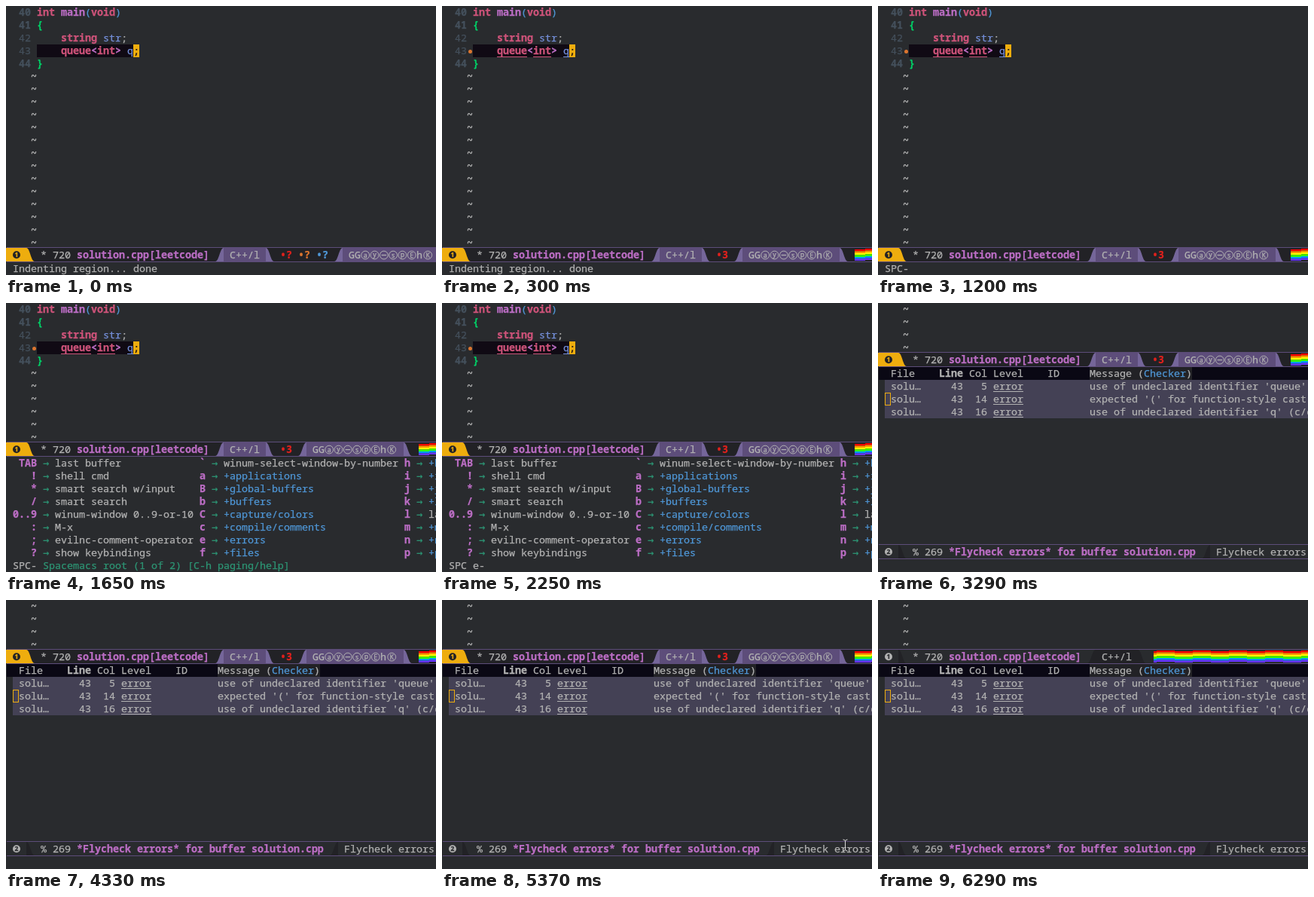
Animation of 571x357 px, one loop 6390 ms. Source, as an HTML page:

```html
<!DOCTYPE html>
<html lang="en">
<head>
<meta charset="utf-8">
<title>Editor session</title>
<style>
  html, body { margin: 0; width: 100%; height: 100%; overflow: hidden; background: #292b2e; }
  svg { display: block; width: 571px; height: 357px; }
  text {
    font: 13.333px "Noto Sans Mono", "DejaVu Sans Mono", monospace;
    white-space: pre; stroke-width: 0.25px;
  }
  .bold { font-weight: 700; }
  .arrow { font-family: "DejaVu Sans Mono", monospace; }
  .tiny { font: 8.8px "Noto Sans", sans-serif; text-anchor: middle; }
  .badge { font: 700 8.5px "Noto Sans", sans-serif; text-anchor: middle; }
</style>
</head>
<body>
<svg id="stage" viewBox="0 0 571 357"></svg>
<script>
const LOOP = 6390, CELL = 8, ROW = 17, LEFT = 9;
const C = {
  bg: '#292b2e', dark: '#222226', deep: '#100a14', head: '#0a0814', base: '#b2b2b2',
  purple: '#5d4d7a', edge: '#75669a', yellow: '#eead0e', type: '#ce537a', func: '#bc6ec5',
  blue: '#4f97d7', name: '#7590db', aqua: '#2d9574', number: '#44505c', brace: '#00cd66',
  red: '#e0211d', orange: '#dc752f', region: '#444155'
};
const stage = document.getElementById('stage');
const scenes = [];

function add(parent, tag, attrs, content) {
  const node = document.createElementNS('http://www.w3.org/2000/svg', tag);
  for (const key in attrs) node.setAttribute(key, attrs[key]);
  if (content !== undefined) node.textContent = content;
  parent.append(node);
  return node;
}
const rect = (g, x, y, width, height, fill) => add(g, 'rect', { x, y, width, height, fill });
const text = (g, x, y, fill, str, cls = '') => add(g, 'text', { x, y, fill, stroke: fill, class: cls }, str);
const place = (g, y) => g.setAttribute('transform', `translate(0 ${y})`);

function scene(from, to) {
  const node = add(stage, 'g', {});
  scenes.push({ node, from, to });
  return node;
}

// Runs are [string, colour, bold]; each continues on the character grid.
function runs(g, x, y, list) {
  for (const [str, fill, bold] of list) {
    text(g, x, y, fill, str, bold ? 'bold' : '');
    x += str.length * CELL;
  }
}

function tildes(g, first, last) {
  for (let i = first; i <= last; i++) text(g, 33, i * ROW + 13, C.base, '~', 'bold');
}

/* ---- source buffer ---- */
const code = scene(0, 3290);
rect(code, 41, 51, 128, ROW, C.deep);
rect(code, 169, 51, CELL, ROW, C.yellow);
[
  [['int', C.type, 1], [' ', C.base], ['main', C.func, 1], ['(', C.blue], ['void', C.type, 1], [')', C.blue]],
  [['{', C.brace, 1]],
  [['    ', C.base], ['string', C.type, 1], [' ', C.base], ['str', C.name], [';', C.base]],
  [['    ', C.base], ['queue', C.type, 1], ['<', C.func, 1], ['int', C.type, 1], ['>', C.func, 1],
   [' ', C.base], ['q', C.name], [';', C.deep]],
  [['}', C.brace, 1]]
].forEach((line, i) => {
  const indented = line.length > 1 && i > 0;
  text(code, 17, i * ROW + 13, C.number, String(40 + i), indented ? '' : 'bold');
  runs(code, 41, i * ROW + 13, line);
});
tildes(code, 5, 18);

const marks = scene(300, 3290);
add(marks, 'circle', { cx: 37.5, cy: 60.5, r: 2.5, fill: C.orange });
for (const [x, chars, fill] of [[73, 5, C.type], [121, 3, C.type], [161, 1, C.name]])
  rect(marks, x, 67, chars * CELL, 1, fill);

/* ---- error list ---- */
const list = scene(3290, LOOP);
tildes(list, 0, 3);
rect(list, 1, 85, 570, ROW, C.head);
rect(list, 281, 85, 136, ROW, C.dark);
for (const [x, str, bold] of [[17, 'File'], [81, 'Line', 1], [121, 'Col'], [153, 'Level'], [225, 'ID']])
  text(list, x, 98, C.base, str, bold ? 'bold' : '');
runs(list, 281, 98, [['Message (', C.base], ['Checker', C.blue], [')', C.base]]);
rect(list, LEFT, 102, 562, 3 * ROW, C.region);
[
  [' 5', "use of undeclared identifier 'queue'"],
  ['14', "expected '(' for function-style cast"],
  ['16', "use of undeclared identifier 'q' (c/c++-clang)"]
].forEach(([col, message], i) => {
  const y = 115 + i * ROW;
  text(list, 17, y, C.base, 'solu…');
  text(list, 97, y, C.base, '43');
  text(list, 129, y, C.base, col);
  text(list, 153, y, C.base, 'error');
  rect(list, 153, y + 2, 40, 1, C.base);
  text(list, 281, y, C.base, message);
});
add(list, 'rect', { x: 9.5, y: 119.5, width: 7, height: 16, fill: 'none', stroke: C.yellow });

/* ---- key hint panels ---- */
function hints(g, top, columns) {
  rect(g, 0, top, 571, 357 - top, C.bg);
  for (const [keyEnd, items] of columns) {
    items.forEach(([key, label], i) => {
      const y = top + i * ROW + 13;
      text(g, keyEnd - key.length * CELL, y, C.func, key, 'bold');
      text(g, keyEnd + 8, y, C.aqua, '→', 'arrow');
      text(g, keyEnd + 24, y, label[0] === '+' ? C.blue : C.base, label);
    });
  }
}
hints(scene(1650, 2550), 204, [
  [41, [['TAB', 'last buffer'], ['!', 'shell cmd'], ['*', 'smart search w/input'], ['/', 'smart search'],
        ['0..9', 'winum-window 0..9-or-10'], [':', 'M-x'], [';', 'evilnc-comment-operator'],
        ['?', 'show keybindings']]],
  [265, [['`', 'winum-select-window-by-number'], ['a', '+applications'], ['B', '+global-buffers'],
         ['b', '+buffers'], ['C', '+capture/colors'], ['c', '+compile/comments'], ['e', '+errors'],
         ['f', '+files']]],
  [537, [['h', '+help'], ['i', '+insert'], ['j', '+jump'], ['k', '+lisp'], ['l', 'layouts'],
         ['m', '+major'], ['n', '+narrow'], ['p', '+projects']]]
]);
hints(scene(2550, 3290), 289, [
  [17, [['.', 'error-transient-state'], ['c', 'flycheck-clear'], ['e', 'flycheck-explain-error-at-point']]],
  [305, [['h', 'flycheck-describe-checker'], ['L', 'goto-flycheck-error-list'], ['l', 'flycheck-error-list']]],
  [545, [['N', 'prev'], ['n', 'next'], ['p', 'prev']]]
]);

/* ---- echo area ---- */
for (const [from, to, prompt, help = ''] of [
  [0, 1200, 'Indenting region... done'],
  [1200, 1650, 'SPC-'],
  [1650, 2100, 'SPC-', ' Spacemacs root (1 of 2) [C-h paging/help]'],
  [2250, 2550, 'SPC e-'],
  [2550, 3290, 'SPC e-', ' errors [C-h paging/help]']
]) runs(scene(from, to), LEFT, 353, [[prompt, C.base], [help, C.aqua]]);

/* ---- mode lines: 18px high between two 1px borders ---- */
const SLANT = 11, BASELINE = 15;
const waves = [];

function bar(g, fill) {
  rect(g, 1, 0, 570, 20, fill);
  return g;
}
function borders(g) {
  rect(g, 1, 0, 570, 1, C.purple);
  rect(g, 1, 19, 570, 1, C.purple);
}
// Segment with curved ends; x1 and x2 bound its flat middle part.
function segment(g, x1, x2, fill, edge = fill) {
  const d = `M${x1 - SLANT} 19c5 0 6 -18 ${SLANT} -18H${x2}c5 0 6 18 ${SLANT} 18Z`;
  add(g, 'path', { d, fill: edge });
  rect(g, x1, 1, x2 - x1, 18, fill);
}
function badge(g, digit, disc, ink) {
  add(g, 'circle', { cx: 14, cy: 10.3, r: 5, fill: disc });
  text(g, 14, 13.4, ink, digit, 'badge');
}
function title(g, flag, size, name) {
  runs(g, 46, BASELINE, [[`${flag} ${size} `, C.base], [name, C.func, 1]]);
}
function minorModes(g, x) {
  text(g, x, BASELINE, C.base, 'GG');
  [...'ay-spE K'].forEach((letter, i) => {
    if (letter === ' ') return;
    const cx = x + 22.2 + (i < 7 ? i * 12.3 : 83);
    add(g, 'circle', { cx, cy: 10.6, r: 5.4, fill: 'none', stroke: C.base });
    if (letter === '-') rect(g, cx - 3.2, 10, 6.4, 1.2, C.base);
    else text(g, cx, 'yp'.includes(letter) ? 12.5 : 13.5, C.base, letter, 'tiny');
  });
  text(g, x + 90, BASELINE, C.base, 'h');
}
function rainbow(g, start) {
  const colours = ['#f00', '#f90', '#ff0', '#3f0', '#09f', '#63f'];
  for (let i = Math.floor((start - 546) / 8), x = 546 + i * 8; x < 571; x += 8, i++) {
    const column = add(g, 'g', {});
    const left = Math.max(x, start);
    colours.forEach((fill, k) => rect(column, left, 2 + k * 2.5, x + 8 - left, 2.5, fill));
    waves.push({ column, i });
  }
}
function activeBar(g) {
  bar(g, C.dark);
  segment(g, 1, 27, C.yellow);
  badge(g, '1', C.dark, C.yellow);
  title(g, '*', 720, 'solution.cpp[leetcode]');
  segment(g, 289, 345, C.purple, C.edge);
  text(g, 297, BASELINE, C.base, 'C++/l');
}

const pending = scene(0, 300);
place(pending, 320);
activeBar(pending);
[C.red, C.orange, C.blue].forEach((fill, i) => text(pending, 364 + i * 24, BASELINE, fill, '•?', 'bold'));
segment(pending, 447, 580, C.purple, C.edge);
minorModes(pending, 455);
borders(pending);

const checked = scene(300, 6290);
activeBar(checked);
text(checked, 364, BASELINE, C.red, '•3', 'bold');
segment(checked, 399, 528, C.purple, C.edge);
minorModes(checked, 407);
rainbow(checked, 548);
borders(checked);

const idle = bar(scene(6290, LOOP), C.bg);
place(idle, 65);
segment(idle, 1, 27, C.bg, C.dark);
badge(idle, '1', C.base, C.bg);
title(idle, '*', 720, 'solution.cpp[leetcode]');
segment(idle, 289, 345, C.dark);
text(idle, 297, BASELINE, C.base, 'C++/l');
rainbow(idle, 366);
borders(idle);

const lower = bar(scene(3290, LOOP), C.bg);
place(lower, 320);
segment(lower, 1, 27, C.bg, C.dark);
badge(lower, '2', C.base, C.bg);
title(lower, '%', 269, '*Flycheck errors* for buffer solution.cpp');
segment(lower, 441, 580, C.bg, C.dark);
text(lower, 449, BASELINE, C.base, 'Flycheck errors');
borders(lower);

/* ---- mouse pointer passing by ---- */
for (const [from, to, x, y] of [[5220, 5370, 561, 280], [5370, 5510, 531, 317], [5510, 5660, 526, 347]])
  add(scene(from, to), 'path', {
    d: `M${x + 1.5} ${y + 1}q3 0 3 2v11q0 2 -3 2m6 -15q-3 0 -3 2v11q0 2 3 2`,
    fill: 'none', stroke: '#d8d8d8'
  });

/* ---- playback ---- */
const LAG = [0, -140, -290];

function waveShift(i, t) {
  const time = Math.min(Math.max(t, 3290), 5650);
  const phase = (i % 3 + 3) % 3;
  const flips = Math.floor((time - 3440 - LAG[phase]) / 590) + Math.floor(i / 3);
  return Math.abs(flips % 2);
}

function draw() {
  const t = performance.now() % LOOP;
  for (const { node, from, to } of scenes)
    node.setAttribute('visibility', t >= from && t < to ? 'visible' : 'hidden');
  place(checked, t < 1650 ? 320 : t < 2550 ? 184 : t < 3290 ? 269 : 65);
  for (const { column, i } of waves) place(column, waveShift(i, t));
  requestAnimationFrame(draw);
}
draw();
</script>
</body>
</html>
```
